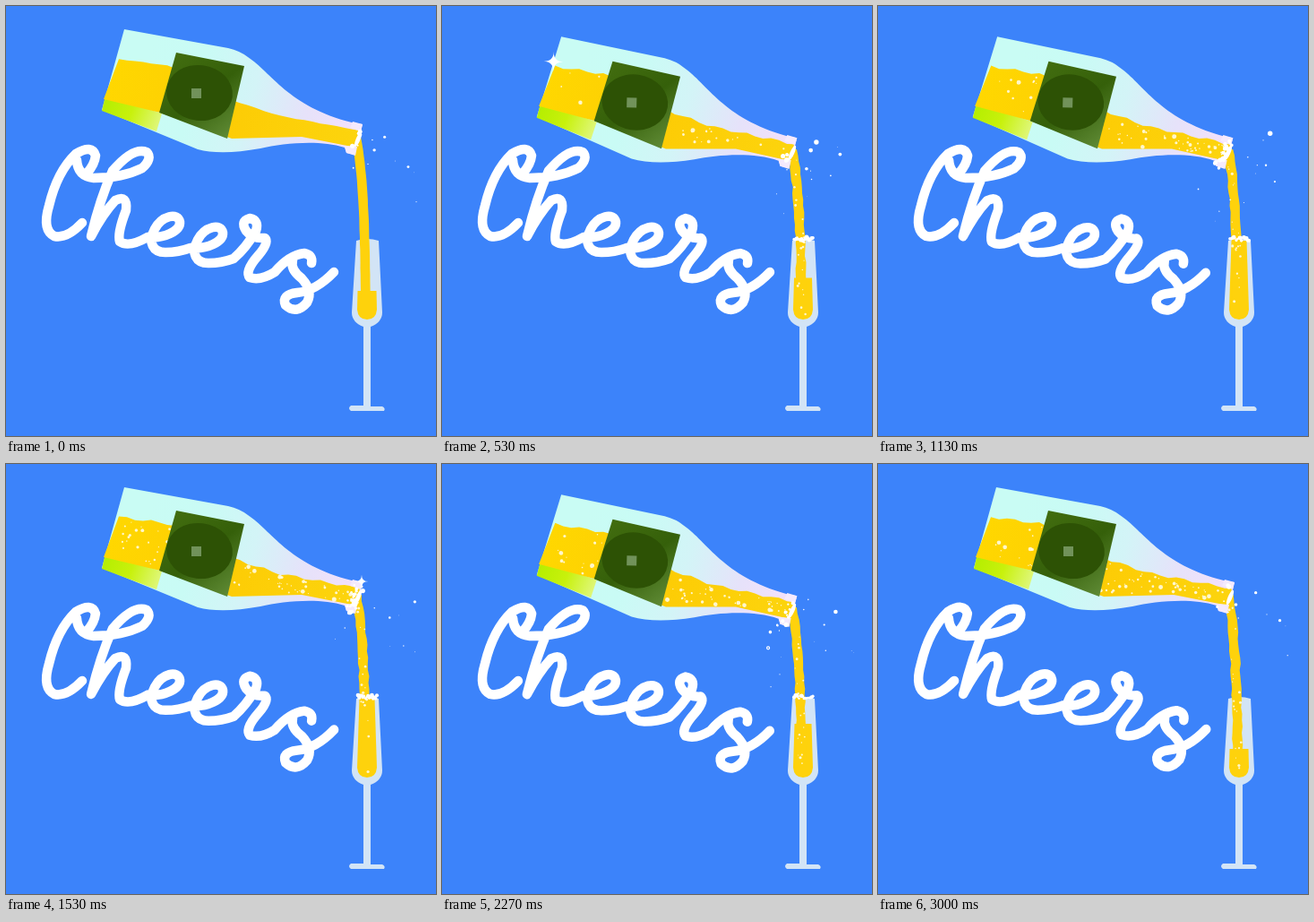
Recreate the animation shown at these times as an HTML page with a canvas. Size 480x480 px, loop 3070 ms.

```html
<!DOCTYPE html>
<html lang="en">
<head>
<meta charset="utf-8">
<title>Cheers</title>
<style>
html, body { margin: 0; width: 100%; height: 100%; overflow: hidden; background: #3c83fa; }
canvas { display: block; width: 100vw; height: 100vh; }
</style>
</head>
<body>
<canvas id="stage" width="480" height="480" role="img" aria-label="Cheers"></canvas>
<script>
const ctx = document.getElementById('stage').getContext('2d');
const LOOP = 3070, STEP = 200 / 3, FRAMES = 46;
const YELLOW = '#fed20c', GLASS = '#d2e4f6', FIZZ = 'rgba(255,251,225,.9)';

const lerp = (a, b, u) => a + (b - a) * u;
function smooth(a, b, v) {
  const u = Math.min(1, Math.max(0, (v - a) / (b - a)));
  return u * u * (3 - 2 * u);
}
function random(seed) {
  return () => {
    seed = (seed + 0x6D2B79F5) | 0;
    let n = Math.imul(seed ^ (seed >>> 15), 1 | seed);
    n = (n + Math.imul(n ^ (n >>> 7), 61 | n)) ^ n;
    return ((n ^ (n >>> 14)) >>> 0) / 4294967296;
  };
}

// Height of a polyline at x
function heightAt(line, x) {
  const i = Math.max(1, line.findIndex(p => p[0] >= x));
  const [a, b] = [line[i - 1], line[i]];
  return lerp(a[1], b[1], (x - a[0]) / (b[0] - a[0]));
}
function dot(x, y, r, ring) {
  ctx.beginPath();
  ctx.arc(x, y, r, 0, 7);
  if (ring) ctx.stroke(); else ctx.fill();
}
function fillPoly(points, style) {
  ctx.fillStyle = style;
  ctx.beginPath();
  points.forEach(p => ctx.lineTo(...p));
  ctx.fill();
}
function gradient(x0, y0, x1, y1, ...colors) {
  const g = ctx.createLinearGradient(x0, y0, x1, y1);
  colors.forEach((c, i) => g.addColorStop(i / (colors.length - 1), c));
  return g;
}

const letterE = new Path2D('M0 0C18 2 37 -7 36 -17C34 -28 16 -24 8 -9C0 6 6 17 20 17C31 17 40 15 48 12');
const word = new Path2D(
  'M85 242Q68 260 54 257Q40 250 48 223Q57 185 78 165Q96 154 100 167Q99 177 90 187' +
  'M79 172Q80 190 98 192Q130 192 152 181Q164 170 157 163Q142 157 119 184Q105 215 95 257' +
  'Q108 232 122 217Q136 210 134 228Q124 254 127 263Q137 270 158 258' +
  'M254 282Q268 270 279 251Q283 239 272 237Q261 240 268 251Q275 260 289 259Q294 264 282 278' +
  'Q266 296 272 303Q284 307 300 297Q316 278 333 276Q343 278 341 287' +
  'M320 284Q317 294 330 304Q343 318 336 331Q324 345 312 334Q307 322 325 320Q346 318 366 297');
word.addPath(letterE, new DOMMatrix([1, 0, 0, 1, 158, 258]));
word.addPath(letterE, new DOMMatrix([1, 0, 0, 1, 206, 270]));

const bottle = new Path2D('M132 26L248 47Q261 50 270 57C296 74 315 112 386 130L398 132L390 166L380 164L378 158C350 149 310 153 284 159Q240 167 214 160L107 116Z');
const belly = new Path2D('M107 117L111 100L174 120L168 140Z');
const lip = new Path2D('M387 129L398 132L396 140L384 136ZM378 156L392 157L390 167L380 164Z');
const glass = new Path2D('M391 262Q403 258 416 262L420 342Q420 353 407 358V447H420Q424 449 422 452H385Q381 449 385 446H399V358Q386 353 386 342Z');
const surface = [[125, 59], [184, 67], [252, 105], [303, 122], [395, 139]];
const bed = [[109, 104], [172, 119], [252, 148], [330, 146], [391, 158]];

// Everything inside tips with the bottle
function tipped(tilt, paint) {
  ctx.save();
  ctx.translate(120, 70 + 8 * tilt);
  ctx.rotate(.026 * tilt);
  ctx.translate(-120, -70);
  paint();
  ctx.restore();
}

function drawLiquid(f) {
  const top = [], rough = f ? 1.5 : .3;
  for (let x = 126; x < 395; x += 9)
    top.push([x, heightAt(surface, x) + rough * Math.sin(x * .2 + f * .7)]);
  fillPoly([...top, [395, 139], ...[...bed].reverse()],
    gradient(110, 70, 390, 150, '#ffd800', '#fdcc05', '#fcd40d'));

  // Fizz drifting towards the neck
  if (!f) return;
  const rnd = random(77), count = 28 + 62 * smooth(8, 23, f);
  ctx.fillStyle = FIZZ;
  for (let i = 0; i < count; i++) {
    const x = lerp(128, 388, (rnd() + f / FRAMES) % 1);
    const y = lerp(heightAt(bed, x) - 2, heightAt(surface, x) + 3, (rnd() + f / FRAMES) % 1);
    dot(x, y, .6 + 2 * rnd() ** 2);
  }
}

function drawBottle(f) {
  ctx.fillStyle = gradient(150, 80, 390, 150, '#c9fcf4', '#c9fbf5', '#d3f4f7', '#e6e2fa', '#f4e0fb');
  ctx.fill(bottle);
  ctx.fillStyle = gradient(108, 106, 172, 130, '#b4ee00', '#c8f10c', '#dff77a');
  ctx.fill(belly);
  drawLiquid(f);
  fillPoly([[190, 52], [266, 67], [247, 148], [171, 119]],
    gradient(185, 60, 250, 145, '#416c0f', '#35600a', '#5f8a35'));
  ctx.fillStyle = '#2d5205';
  ctx.beginPath();
  ctx.ellipse(216, 97, 37, 31, .12, 0, 7);
  ctx.fill();
  ctx.fillStyle = '#71925a';
  ctx.fillRect(207, 92, 11, 11);
}

function drawGlass(f) {
  ctx.fillStyle = GLASS;
  ctx.fill(glass);
  const level = lerp(318, 262, smooth(4, 16, f) * (1 - smooth(30, 38, f)));
  const wide = lerp(8.5, 10.5, (level - 262) / 56);
  ctx.fillStyle = YELLOW;
  ctx.beginPath();
  ctx.moveTo(403 - wide, level);
  ctx.lineTo(403 + wide, level);
  ctx.lineTo(414, 339);
  ctx.quadraticCurveTo(413, 350, 403, 350);
  ctx.quadraticCurveTo(393, 350, 392, 339);
  ctx.fill();
}

function drawStream(f, tilt) {
  const rnd = random(f * 13 + 3), y0 = 146 + 14 * tilt, rough = f ? 1.6 : .3;
  const mid = y => 402 - 11 * Math.exp((y0 - y) / 60);
  const left = [], right = [];
  for (let y = y0; y <= 330; y += 7) {
    left.push([mid(y) - 5.4 + rough * (rnd() - .5), y]);
    right.unshift([mid(y) + 5.2 + rough * (rnd() - .5), y]);
  }
  fillPoly([...left, ...right], YELLOW);
  if (!f) return;
  ctx.fillStyle = FIZZ;
  for (let i = 0; i < 20; i++) {
    const y = lerp(y0 + 8, 345, rnd());
    dot(mid(y) + (rnd() - .5) * 9, y, .5 + rnd() * 1.1);
  }
}

function drawLip(f) {
  const rnd = random(f * 17 + 9);
  const foam = smooth(7, 17, f) * (1 - smooth(28, 37, f));
  ctx.fillStyle = '#f5eafd';
  ctx.fill(lip);
  ctx.fillStyle = '#fff';
  ctx.beginPath();
  ctx.ellipse(393, 149, 2.4, 9, .4, 0, 7);
  ctx.fill();
  for (let i = 0; i < 4 + 22 * foam; i++) {
    const v = rnd();
    dot(lerp(394, 381, v) + (rnd() - .5) * 11, lerp(137, 166, v) + (rnd() - .5) * 7, .8 + rnd() * 2);
  }
}

function drawFroth(f) {
  const rnd = random(f * 23 + 2), amount = smooth(3, 8, f) * (1 - smooth(40, 45, f));
  ctx.fillStyle = '#fff';
  for (let i = 0; i < 16 * amount; i++)
    dot(393 + i * 1.4, 260 + (rnd() - .5) * 4, 1 + rnd() * 1.5);
}

// Drops burst from the neck, slow down, sink and shrink
function drawDrops(f) {
  const rnd = random(41), life = 12;
  ctx.fillStyle = ctx.strokeStyle = '#fff';
  ctx.lineWidth = 1.2;
  for (let i = 0; i < 44; i++) {
    const age = (f + rnd() * FRAMES) % FRAMES;
    const reach = rnd() < .7 ? lerp(14, 72, rnd()) : lerp(-10, -38, rnd());
    const drift = reach < 0 ? lerp(25, 75, rnd()) : lerp(-25, 50, rnd());
    const r = .8 + 3.2 * rnd() ** 4, ring = rnd() < .12;
    if (age > life) continue;
    const out = 1 - Math.exp(-age / 2.5);
    dot(393 + reach * out, 155 + drift * out + .25 * age * age, r * (1 - age / life / 1.5), ring);
  }
}

// A glint visits the base, the neck and the shoulder in turn
function drawGlint(f) {
  const [x, y] = [[124, 54], [397, 131], [332, 101]][Math.floor(f / 16) % 3];
  const r = 11 * (1 - Math.abs(f % 16 - 8) / 3);
  if (r <= 0) return;
  ctx.fillStyle = '#fff';
  ctx.beginPath();
  ctx.moveTo(x, y - r);
  for (const [dx, dy] of [[1, 0], [0, 1], [-1, 0], [0, -1]])
    ctx.quadraticCurveTo(x, y, x + dx * r, y + dy * r);
  ctx.fill();
}

function drawWord(f) {
  ctx.save();
  ctx.translate(60, 210);
  ctx.rotate(.003 * Math.sin(f * .8));
  ctx.translate(-60, -210);
  ctx.strokeStyle = '#fff';
  ctx.lineWidth = 10.5;
  ctx.lineCap = ctx.lineJoin = 'round';
  ctx.stroke(word);
  ctx.restore();
}

function draw(now) {
  const f = Math.min(FRAMES - 1, Math.floor((now % LOOP + 4) / STEP));
  const phase = f % 23;
  const tilt = smooth(4, 8, phase) * (1 - smooth(17, 22, phase));
  ctx.fillStyle = '#3c83fa';
  ctx.fillRect(0, 0, 480, 480);
  drawWord(f);
  tipped(tilt, () => drawBottle(f));
  drawGlass(f);
  drawStream(f, tilt);
  tipped(tilt, () => { drawLip(f); drawGlint(f); });
  drawFroth(f);
  drawDrops(f);
  requestAnimationFrame(() => draw(performance.now()));
}
draw(0);
</script>
</body>
</html>
```
